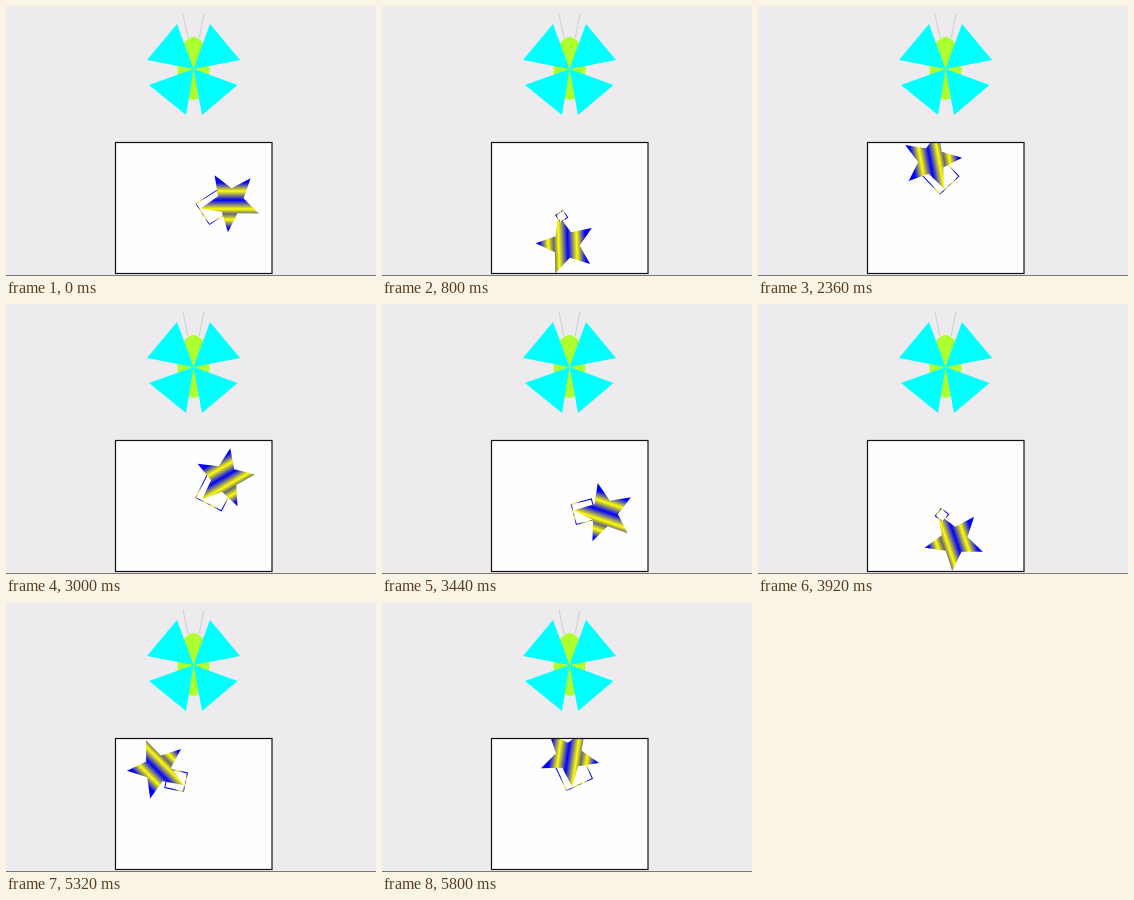
An HTML page with a canvas that plays this animation: 370 by 270 pixels, repeating every 5880 ms.

```html
<!DOCTYPE html>
<html lang="en">
<head>
<meta charset="utf-8">
<title>Butterfly and star</title>
<style>
html, body { margin: 0; width: 100%; height: 100%; overflow: hidden; background: #edebee; }
canvas { display: block; }
</style>
</head>
<body>
<canvas id="stage" width="370" height="270"></canvas>
<script>
const ctx = document.getElementById('stage').getContext('2d');
const LOOP = 5880, STEP = 40, LAST = 145;
const rad = deg => deg * Math.PI / 180;

function polygon(points) {
  ctx.beginPath();
  points.forEach(([x, y]) => ctx.lineTo(x, y));
  ctx.closePath();
}

function stripes(top, bottom) {
  const g = ctx.createLinearGradient(0, top, 0, bottom);
  const stops = [[0, '#00f'], [.19, '#00f'], [.33, '#ff0'], [.475, '#00f'],
    [.62, '#ff0'], [.7, '#66667a'], [.79, '#ff0'], [.93, '#00f'], [1, '#00f']];
  stops.forEach(([at, color]) => g.addColorStop(at, color));
  return g;
}

function butterfly() {
  ctx.strokeStyle = '#cfcdd0';
  ctx.lineWidth = 1;
  for (const side of [-1, 1]) {
    ctx.beginPath();
    ctx.moveTo(187.5 + side * 5.5, 32);
    ctx.lineTo(187.5 + side * 10.5, 8);
    ctx.stroke();
  }
  ctx.fillStyle = '#adff2f';
  ctx.beginPath();
  ctx.ellipse(187.5, 62.5, 16, 31.5, 0, 0, 2 * Math.PI);
  ctx.fill();
  ctx.fillStyle = '#0ff';
  const wings = [[171, 18, 141, 54], [204, 18, 234, 54], [143, 79, 180, 109], [231.5, 79, 196, 109]];
  for (const [ax, ay, bx, by] of wings) {
    polygon([[187.5, 63], [ax, ay], [bx, by]]);
    ctx.fill();
  }
}

function star() {
  ctx.save();
  ctx.translate(42.5, -0.7);
  polygon(Array.from({ length: 10 }, (_, i) => {
    const r = i % 2 ? 13.5 : 30.7, a = rad(22.8 + 36 * i);
    return [r * Math.cos(a), r * Math.sin(a)];
  }));
  ctx.fillStyle = stripes(-31, 31);
  ctx.fill();
  ctx.restore();
}

function square(size) {
  const a = rad(57), c = size * Math.cos(a), s = size * Math.sin(a);
  const x = 8, y = 1.5;
  polygon([[x, y], [x + c, y + s], [x + c + s, y + s - c], [x + s, y - c]]);
  ctx.fillStyle = '#fefefe';
  ctx.fill();
  ctx.strokeStyle = stripes(y - c, y + s);
  ctx.lineWidth = 1;
  ctx.stroke();
}

function draw(now) {
  const n = Math.min(LAST, Math.floor(now % LOOP / STEP));
  const turn = 4.4 * n;
  const size = Math.max(8.5, 17 + 13 * Math.cos(rad(turn - 306)));

  ctx.fillStyle = '#edebee';
  ctx.fillRect(0, 0, 370, 270);
  ctx.fillStyle = '#777';
  ctx.fillRect(0, 269, 370, 1);
  butterfly();

  ctx.fillStyle = '#fefefe';
  ctx.fillRect(109, 136, 157, 132);
  ctx.save();
  ctx.beginPath();
  ctx.rect(109, 136, 157, 132);
  ctx.clip();
  ctx.translate(182, 196.3);
  ctx.rotate(rad(turn));
  // The small square covers the tip of the star; the large one lies behind it.
  const parts = [() => square(size), star];
  if (size < 12) parts.reverse();
  parts.forEach(part => part());
  ctx.restore();
  ctx.strokeStyle = '#111';
  ctx.lineWidth = 1.2;
  ctx.strokeRect(109.5, 136.5, 156.5, 131);

  requestAnimationFrame(tick);
}

const start = performance.now();
function tick() { draw(performance.now() - start); }
tick();
</script>
</body>
</html>
```
